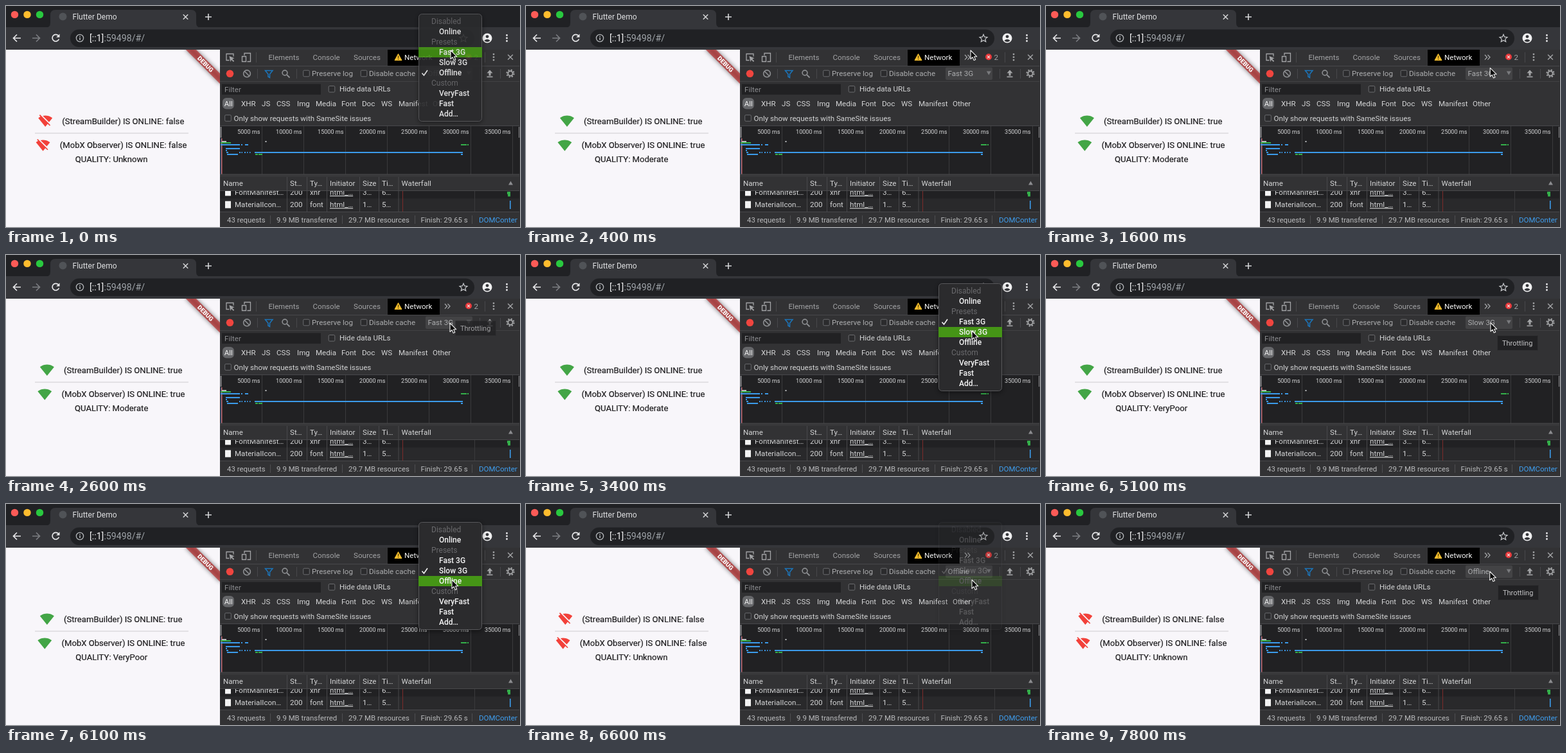
Recreate the animation shown at these times as an HTML page. Size 800x344 px, loop 8 s.

```html
<!DOCTYPE html>
<html lang="en">
<head>
<meta charset="utf-8">
<title>Network throttling demo</title>
<style>
  html, body { margin: 0; width: 100%; height: 100%; overflow: hidden; background: #202124; }
  svg { display: block; width: 800px; height: 344px; font-family: Roboto, "Liberation Sans", sans-serif; }
  text { white-space: pre; }
  .soft { filter: blur(3.7px); }
  #status text { stroke: #1d1c1e; stroke-width: .2px; }
</style>
</head>
<body>
<svg id="stage" viewBox="0 0 800 344" xmlns="http://www.w3.org/2000/svg"></svg>
<script>
const stage = document.getElementById('stage');
const GREY = '#a3a4a6', LIGHT = '#d4d5d6', BLUE = '#3b9bea', GREEN = '#34b04a';
const PANEL = '#323234', DARK = '#212123', RULE = '#48484b';

// Markup helpers; text is placed by its vertical centre.
const rect = (x, y, w, h, fill, more = '') =>
  `<rect x="${x}" y="${y}" width="${w}" height="${h}" fill="${fill}" ${more}/>`;
const dot = (x, y, r, fill, more = '') => `<circle cx="${x}" cy="${y}" r="${r}" fill="${fill}" ${more}/>`;
const ring = (x, y, r, color, w = 1.4) => dot(x, y, r, 'none', `stroke="${color}" stroke-width="${w}"`);
const line = (d, color, w = 1.4, more = '') =>
  `<path d="${d}" fill="none" stroke="${color}" stroke-width="${w}" ${more}/>`;
const shape = (d, fill, more = '') => `<path d="${d}" fill="${fill}" ${more}/>`;
const text = (x, cy, s, size = 11.6, fill = LIGHT, more = '') =>
  `<text x="${x}" y="${cy + size * 0.355}" font-size="${size}" fill="${fill}" ${more}>${s}</text>`;
const cross = (x, y, r, color, w = 1.5) =>
  line(`M${x - r} ${y - r}l${2 * r} ${2 * r}m0 ${-2 * r}l${-2 * r} ${2 * r}`, color, w);
const box = (x, y) => rect(x - 4.8, y - 4.8, 9.6, 9.6, '#2b2b2d', 'rx="1.5" stroke="#6b6c6f"');
const bar = (y, color, ...spans) =>
  spans.map(([a, b]) => rect(a, y - 1, b - a, 2, color)).join('');
const dots3 = (x, y, color) => [-4.5, 0, 4.5].map(d => dot(x, y + d, 1.4, color)).join('');
const vline = (x, y, h, color = RULE) => rect(x, y, 1, h, color);

function browser() {
  return rect(0, 0, 800, 34, '#202124')
    + shape('M61 34q8 0 8-8V14q0-8 8-8H288q8 0 8 8V26q0 8 8 8z', '#35363a')
    + rect(0, 33, 800, 35, '#35363a')
    + dot(13.5, 13.4, 5.7, '#fc5b57') + dot(33, 13.4, 5.7, '#fdbc2e') + dot(52.5, 13.4, 5.7, '#29c83f')
    + dot(88.5, 16.5, 6, '#505357')
    + text(103.5, 16.7, 'Flutter Demo', 12, '#dfe0e2')
    + cross(279.5, 17, 3.7, '#d5d6d8') + line('M310 17h10m-5-5v10', '#d5d6d8', 1.6)
    + line('M23 50H11.5m5.5-5.5l-5.5 5.5 5.5 5.5', '#e8e8ea', 1.7)
    + line('M41 50h11.5m-5.5-5.5l5.5 5.5-5.5 5.5', '#7b7d81', 1.7)
    + line('M81.5 46.3A5.3 5.3 0 1 0 82.4 51.5', '#e8e8ea', 1.7) + shape('M83.5 43.5v5.3h-5.3z', '#e8e8ea')
    + rect(100, 36.5, 629, 27.5, '#202124', 'rx="13.7"')
    + ring(115, 50, 5.6, '#b4b7ba', 1.3) + rect(114.3, 49, 1.5, 4, '#b4b7ba') + rect(114.3, 46.5, 1.5, 1.5, '#b4b7ba')
    + text(130, 49.7, '<tspan fill="#f6f6f7">[::1]</tspan>:59498/#/', 14.2, '#9fa4a9')
    + line('M712 44.2l1.7 4 4.3.4-3.3 2.8 1 4.2-3.7-2.2-3.7 2.2 1-4.2-3.3-2.8 4.3-.4z', '#c9cbce', 1.2)
    + dot(749, 50, 7.5, '#f1f1f2') + dot(749, 47.6, 2.4, '#35363a') + shape('M744.3 54q4.7-4.6 9.4 0-4.7 4-9.4 0z', '#35363a')
    + dots3(779.5, 50, '#e8e8ea');
}

function toolbars() {
  const types = [['XHR', 366], ['JS', 398], ['CSS', 421], ['Img', 453], ['Media', 482], ['Font', 522],
    ['Doc', 554], ['WS', 584], ['Manifest', 611], ['Other', 664]];
  return rect(333, 68, 467, 276, PANEL)
    // panel tabs
    + line('M347.5 84.5h-4.5v-10h11v4', GREY, 1.3) + shape('M347.5 78l8 3.2-3.3 1.3 3 3.2-1.3 1.2-3-3.1-1.5 3.2z', GREY)
    + line('M371 77v-3.5h9.500v13h-5', GREY, 1.3) + line('M367.5 78.5h6v8h-6z', GREY, 1.3)
    + vline(389, 72, 16)
    + text(408.5, 79.4, 'Elements', 11.6, GREY) + text(477.5, 79.4, 'Console', 11.6, GREY) + text(541, 79.4, 'Sources', 11.6, GREY)
    + rect(594, 68, 81, 25, '#000')
    + shape('M610.5 74.5l5.5 10h-11z', '#f5bd2c', 'stroke="#f5bd2c" stroke-linejoin="round"')
    + rect(609.9, 77.5, 1.3, 3.5, '#4a3500') + rect(609.9, 82, 1.3, 1.3, '#4a3500')
    + text(620, 79.4, 'Network', 11.6, '#f6f6f6')
    + line('M683 76l3.5 3.8-3.5 3.8m4.5-7.6l3.5 3.8-3.5 3.8', GREY, 1.3)
    + dot(720, 79.3, 5, '#e8393b') + cross(720, 79.3, 2, '#f5e3e3', 1.2) + text(728.5, 79.4, '2', 11.6, GREY)
    + vline(745, 72, 16) + dots3(759, 79.6, GREY) + cross(785, 79.6, 3.9, GREY, 1.4)
    + rect(333, 93, 467, 1, RULE)
    // network actions
    + dot(348.5, 105.3, 5.8, '#f0453f')
    + ring(375, 105.3, 5.4, '#8c8e91', 1.6) + line('M371.3 101.6l7.4 7.4', '#8c8e91', 1.6)
    + vline(391, 98, 15)
    + line('M403.5 100.5h11.5l-4.5 5.5v5.5l-2.5-1.5v-4z', '#1c76bb', 1.5)
    + ring(434, 104, 3.9, '#8c8e91', 1.6) + line('M437 107l4.5 4.5', '#8c8e91', 1.8)
    + vline(452, 98, 15)
    + box(467.5, 105) + text(476, 105, 'Preserve log', 11.6, '#acadaf')
    + box(557, 105) + text(565, 105, 'Disable cache', 11.6, '#acadaf')
    + rect(653, 95.5, 73, 19.5, '#434345', 'rx="2"') + shape('M716.8 101.5h7l-3.5 6z', '#7a7b7e')
    + `<g id="select"></g>`
    + vline(737, 98, 15)
    + shape('M753 99.5l4.5 5h-3v4h-3v-4h-3z', GREY) + rect(748.5, 109.5, 9, 1.6, GREY)
    + vline(769, 98, 15)
    + ring(785, 105, 3.7, GREY, 2)
    + dot(785, 105, 5.6, 'none', `stroke="${GREY}" stroke-width="2" stroke-dasharray="2.2 2.198"`)
    + rect(333, 117, 467, 1, '#424244')
    // filters
    + rect(336, 121.5, 154, 16.5, DARK) + text(340, 129.7, 'Filter', 11.6, '#8b8c8f')
    + box(507, 129.3) + text(519, 129.3, 'Hide data URLs')
    + rect(337, 143, 18, 17.5, '#66676a', 'rx="6"') + text(339.7, 151.8, 'All', 11.6, '#f3f3f3')
    + types.map(([s, x]) => text(x, 151.8, s)).join('')
    + box(345.5, 174.5) + text(354.5, 174.7, 'Only show requests with SameSite issues');
}

function overview() {
  let s = rect(333, 187, 467, 75, DARK) + rect(333, 186, 467, 1, RULE);
  for (let i = 1; i <= 7; i++) {
    const x = 333 + 65 * i;
    s += vline(x, 187, 75, '#3a3a3c') + text(x - 2.5, 195.5, i * 5000 + ' ms', 9.1, '#d6d7d8', 'text-anchor="end"');
  }
  return s + rect(333.5, 188, 2, 17, '#87888b') + rect(798, 188, 2, 17, '#87888b')
    + vline(334, 206, 56, '#2a5a8c') + rect(335, 206, 1.5, 56, '#c4605c')
    + bar(211, '#b9bbbd', [336, 343], [403.5, 405.5]) + bar(213, GREEN, [334, 350])
    + bar(216, BLUE, [334, 364], [366, 368], [372, 377])
    + bar(222, BLUE, [342, 364]) + bar(225, BLUE, [342, 344])
    + bar(228, BLUE, [343, 346], [363, 365], [366.5, 368], [371, 373], [375, 376.5], [379, 380.5], [387, 711])
    + bar(231, BLUE, [344, 361], [708, 711]) + bar(231, GREEN, [388, 392], [393, 399])
    + bar(216, GREEN, [708, 717], [718, 720])
    + rect(333, 262, 467, 4, '#38383a') + rect(333, 261.5, 467, 1, RULE);
}

function requests() {
  const cols = [338, 442, 473, 504, 555, 585, 615.5];
  const heads = ['Name', 'St…', 'Ty…', 'Initiator', 'Size', 'Ti…', 'Waterfall'];
  const row = (y, cells) => rect(341, y - 5.5, 9, 11, '#f4f4f4')
    + cells.map((c, i) => text(i ? cols[i] : 356, y, c, 11.6, LIGHT,
        i === 3 ? 'text-decoration="underline"' : '')).join('');
  return rect(333, 287, 467, 13, DARK) + rect(333, 299.5, 467, 20.5, '#29292b')
    + `<clipPath id="rows"><rect x="333" y="288" width="467" height="32"/></clipPath><g clip-path="url(#rows)">`
    + vline(729, 288, 32, '#3a3a3c')
    + row(290, ['FontManifest…', '200', 'xhr', 'html_…', '3…', '6…'])
    + row(309.2, ['MaterialIcon…', '200', 'font', 'html_…', '1…', '5…'])
    + rect(780, 289, 3, 4, GREEN) + rect(781, 289, 4, 7.5, GREEN) + rect(784, 303, 1.6, 13, BLUE) + '</g>'
    + rect(333, 266, 467, 21.5, PANEL) + rect(333, 287, 467, 1, RULE)
    + heads.map((h, i) => text(cols[i], 276.1, h)).join('')
    + cols.slice(1).map(x => vline(x - 5, 266, 54, RULE)).join('')
    + vline(617, 288, 32, '#7c2b2a') + shape('M782 278.5h7l-3.5-6z', '#8b8c8f')
    // summary
    + rect(333, 320, 467, 24, PANEL) + rect(333, 320, 467, 1, RULE)
    + [[344, '43 requests'], [421, '9.9 MB transferred'], [533, '29.7 MB resources'], [645.5, 'Finish: 29.65 s']]
        .map(([x, s]) => text(x, 332.5, s, 11.4, '#babbbd')).join('')
    + [411, 523, 636, 725].map(x => vline(x, 326, 13, '#4e4e51')).join('')
    + `<clipPath id="cut"><rect x="730" y="320" width="66" height="24"/></clipPath>`
    + text(736, 332.5, 'DOMContentLoaded', 11.5, '#3f9ff0', 'clip-path="url(#cut)"')
    + vline(799, 68, 276, '#2a2a2c');
}

function page() {
  const band = more => rect(-38, 26.2, 76, 11.3, more);
  return rect(0, 68, 333, 276, '#f8f6fa') + rect(45, 197.5, 239, 1, '#cfcdd1')
    + `<clipPath id="view"><rect y="68" width="333" height="276"/></clipPath>`
    + `<g clip-path="url(#view)"><g transform="translate(333 68) rotate(45)">`
    + band('#000" class="soft" opacity=".5') + band('#b71c1c" opacity=".627')
    + text(0, 31.8, 'DEBUG', 9.6, '#fff', 'font-weight="900" text-anchor="middle"') + '</g></g>'
    + `<g id="status"></g>`;
}

const FAN = 'M12 21.5L23.6 7C23.2 6.7 18.7 3 12 3S.8 6.7.4 7z';
const FAN_OFF = 'M23.6 7C23.2 6.7 18.7 3 12 3q-2.2 0-4.2.5L18.2 13.8zM17 15.2L3.3 1.4 2 2.7l2 2.1Q1.8 5.8.4 7L12 21.5l3.9-4.9 3.3 3.3 1.3-1.2z';

function status(online, quality) {
  const dx = online ? 0 : -2.7;
  const icon = (x, y) => shape(online ? FAN : FAN_OFF, online ? '#43a546' : '#f2413a',
    `transform="translate(${x + dx} ${y}) scale(.94)"`);
  const ink = '#1d1c1e';
  return icon(52.6, 167.8) + text(90 + dx, 179.4, `(StreamBuilder) IS ONLINE: ${online}`, 13.1, ink)
    + icon(49, 205.6) + text(86.5 + dx, 216.8, `(MobX Observer) IS ONLINE: ${online}`, 13.1, ink)
    + text(164.2, 238, 'QUALITY: ' + quality, 13.1, ink, 'text-anchor="middle"');
}

const ITEMS = ['Disabled', 'Online', 'Presets', 'Fast 3G', 'Slow 3G', 'Offline', 'Custom', 'VeryFast', 'Fast', 'Add…'];
const HEADERS = [0, 2, 6];

// The checked row always sits over the select control.
function menu(checked, lit) {
  const mid = i => 104 + 16 * (i - checked);
  const top = mid(0) - 12;
  return rect(642, top + 2, 99, 168, '#000', 'rx="5" opacity=".45" class="soft"')
    + rect(642.5, top + .5, 98, 167, '#2b2b2d', 'rx="5" stroke="#59595c"')
    + (lit ? rect(642, mid(lit) - 8, 99, 16, '#459516') : '')
    + ITEMS.map((s, i) => HEADERS.includes(i)
        ? text(662, mid(i), s, 12, '#6a6a6d')
        : text(674, mid(i), s, 12, '#f4f4f5', 'font-weight="500"')).join('')
    + line('M647.5 104.5l3 3.5 5.5-8', '#f4f4f5', 1.6);
}

const tooltip = (x, y) => rect(x + .5, y + .5, 63, 23, '#212123', 'rx="1" stroke="#2f2f31"')
  + text(x + 8, y + 12, 'Throttling', 11, '#c4c4c6');

stage.innerHTML = page() + browser() + toolbars() + overview() + requests()
  + '<g id="tip"></g><g id="menu"></g><g id="cursor">'
  + shape('M0 0V13.5L3.1 10.7 5.2 15.6 7.7 14.5 5.6 9.8H9.8z', '#0a0a0a',
      'stroke="#f2f2f2" stroke-width="1.1" stroke-linejoin="round"') + '</g>';

// Hard steps: [time, ...state]
const STATUS = [[0, false, 'Unknown'], [300, true, 'Moderate'], [4000, true, 'VeryPoor'], [6600, false, 'Unknown']];
const SELECT = [[0, 'Offline'], [200, 'Fast 3G'], [3900, 'Slow 3G'], [6500, 'Offline']];
const MENU = [
  [0, 5, 3, .9], [100, 5, 3, .55], [200, 5, 3, .2], [300, 5, 0, 0],
  [2800, 3, 3, 1], [3200, 3, 4, 1], [3700, 3, 0, 1], [3800, 3, 4, .9], [3900, 3, 4, .55], [4000, 3, 4, .2], [4100, 3, 0, 0],
  [5500, 4, 4, 1], [5900, 4, 5, 1], [6300, 4, 0, 1], [6400, 4, 5, .9], [6500, 4, 5, .55], [6600, 4, 5, .2], [6700, 4, 0, 0]];
const TIP = [
  [0, 699, 102, 0], [1900, 699, 102, .4], [2000, 699, 102, .8], [2100, 699, 102, 1],
  [2600, 699, 102, .75], [2700, 699, 102, .3], [2800, 702, 125, 0],
  [4900, 702, 125, .35], [5000, 702, 125, .75], [5100, 702, 125, 1], [5300, 702, 125, .6], [5400, 702, 125, .2],
  [5500, 703, 126, 0], [7600, 703, 126, .35], [7700, 703, 126, .75], [7800, 703, 126, 1]];
// Cursor moves: [start, end, x, y]
const MOVES = [[0, 0, 692, 69], [1200, 1800, 691, 106], [2800, 3300, 694, 118], [4200, 4400, 692, 105.5],
  [5500, 6000, 694, 118], [7200, 7400, 690.7, 105]];

const at = (list, t) => list.reduce((a, s) => s[0] <= t ? s : a).slice(1);
const ease = k => k * k * (3 - 2 * k);

function cursorAt(t) {
  let [, , x, y] = MOVES[0];
  for (const [a, b, tx, ty] of MOVES.slice(1)) {
    if (t < a) break;
    const k = ease(Math.min(1, (t - a) / (b - a)));
    x += (tx - x) * k;
    y += (ty - y) * k;
  }
  return [x, y];
}

const parts = {}, last = {};
for (const id of ['status', 'select', 'tip', 'menu', 'cursor']) parts[id] = document.getElementById(id);

function put(id, state, draw) {
  const key = state.join();
  if (last[id] === key) return;
  last[id] = key;
  parts[id].innerHTML = draw(...state);
}

function fade(id, state, draw) {
  const alpha = state.pop();
  put(id, state, draw);
  parts[id].setAttribute('opacity', alpha);
}

function render(ms) {
  const t = Math.floor((ms % 8000) / 100) * 100;
  put('status', at(STATUS, t), status);
  put('select', at(SELECT, t), s => text(656.5, 105, s, 11.6, '#acadaf'));
  fade('menu', at(MENU, t), menu);
  fade('tip', at(TIP, t), tooltip);
  parts.cursor.setAttribute('transform', `translate(${cursorAt(t)})`);
}

const start = performance.now();
function tick() {
  render(performance.now() - start);
  requestAnimationFrame(tick);
}
tick();
</script>
</body>
</html>
```
